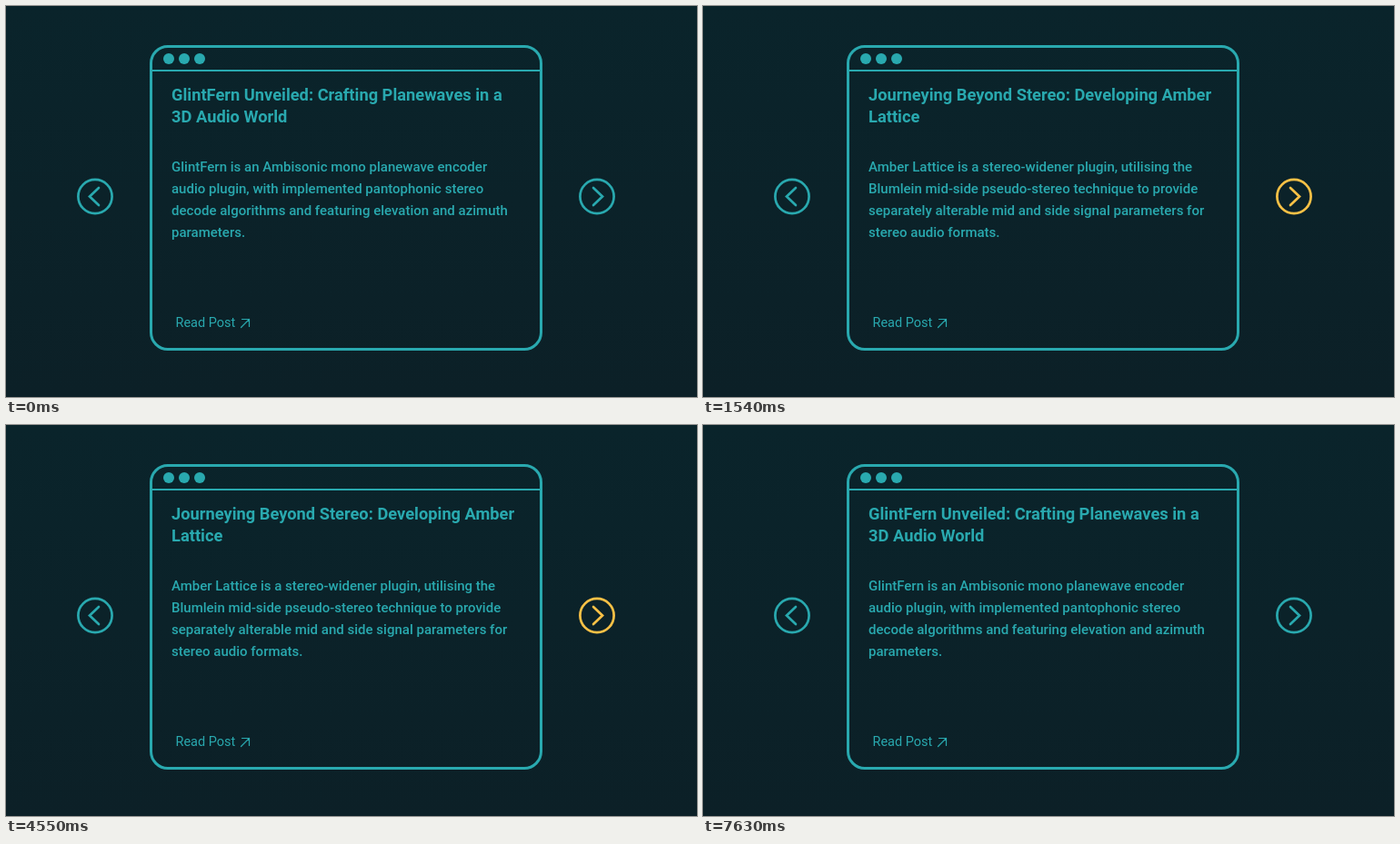
An HTML page for the animation above (8000 ms loop, 760 by 430 pixels).

```html
<!DOCTYPE html>
<html lang="en">
<head>
<meta charset="utf-8">
<title>Post carousel</title>
<style>
  html, body { margin: 0; width: 100%; height: 100%; overflow: hidden; background: #0b2229; }
  svg { display: block; width: 760px; height: 430px; font-family: Roboto, sans-serif; }
  .line { fill: none; stroke: #29a9af; stroke-width: 2.7; stroke-linecap: round; }
  .dots, text { fill: #29a9af; }
  .title { font-size: 18.3px; font-weight: 700; }
  .body { font-size: 15px; font-weight: 500; }
  .read { font-size: 14.5px; font-weight: 400; }
</style>
</head>
<body>
<svg viewBox="0 0 760 430">
  <defs>
    <linearGradient id="bg" x2="0" y2="1">
      <stop stop-color="#0a242b"/>
      <stop offset="1" stop-color="#0c2027"/>
    </linearGradient>
    <g id="arrow">
      <circle r="18.6"/>
      <path d="M-4-9.5 6 0-4 9.5"/>
    </g>
  </defs>
  <rect width="760" height="430" fill="url(#bg)"/>
  <rect class="line" x="159.5" y="44.5" width="429" height="333" rx="18.5" style="stroke-width:3"/>
  <path class="line" d="M160 71H588" style="stroke-width:2"/>
  <g class="dots">
    <circle cx="179" cy="58" r="6"/>
    <circle cx="196" cy="58" r="6"/>
    <circle cx="213" cy="58" r="6"/>
  </g>
  <use class="line" href="#arrow" transform="translate(98 209.5) scale(-1 1)"/>
  <use class="line" href="#arrow" transform="translate(650 209.5)" id="next"/>
  <g id="posts"></g>
  <text class="read" x="186.5" y="353">Read Post</text>
  <path class="line" d="M258.5 353.5 267.5 344.5M259.5 344.5H267.5V352.5" style="stroke-width:1.2"/>
</svg>
<script>
const LOOP = 8000, FADE = 500;
const TEAL = [41, 169, 175], GOLD = [249, 193, 70];

// Two title lines, then the body
const posts = [
  ["GlintFern Unveiled: Crafting Planewaves in a", "3D Audio World",
   "GlintFern is an Ambisonic mono planewave encoder",
   "audio plugin, with implemented pantophonic stereo",
   "decode algorithms and featuring elevation and azimuth", "parameters."],
  ["Journeying Beyond Stereo: Developing Amber", "Lattice",
   "Amber Lattice is a stereo-widener plugin, utilising the",
   "Blumlein mid-side pseudo-stereo technique to provide",
   "separately alterable mid and side signal parameters for", "stereo audio formats."],
  ["Mixing to Making: How Understanding Music", "Keys Can Elevate Your DJ Game",
   "An understanding of the circle of fifths, and music key",
   "counterparts to camelot key codes can be a helpful first",
   "step in bridging the gap between DJing, improvisation", "and music production."]
];
const clicks = [1540, 2520, 3500, 4550, 5530, 6580];

const next = document.getElementById("next");
const groups = posts.map(lines => {
  const g = document.createElementNS("http://www.w3.org/2000/svg", "g");
  g.innerHTML = lines.map((s, i) =>
    `<text class="${i < 2 ? "title" : "body"}" x="182" y="${i < 2 ? 104 + 24 * i : 134 + 24 * i}">${s}</text>`
  ).join("");
  document.getElementById("posts").append(g);
  return g;
});

// The CSS "ease" curve
function ease(x) {
  if (x <= 0) return 0;
  if (x >= 1) return 1;
  const curve = (a, b, u) => 3 * a * u * (1 - u) ** 2 + 3 * b * u * u * (1 - u) + u ** 3;
  let lo = 0, hi = 1;
  for (let i = 0; i < 20; i++) {
    const mid = (lo + hi) / 2;
    if (curve(.25, .25, mid) < x) lo = mid; else hi = mid;
  }
  return curve(.1, 1, lo);
}

function draw(now) {
  const t = now % LOOP;
  const hover = ease((t - 735) / FADE) - ease((t - 7105) / FADE);
  next.style.stroke = `rgb(${TEAL.map((c, i) => c + (GOLD[i] - c) * hover)})`;
  const shown = clicks.filter(c => t >= c).length % posts.length;
  groups.forEach((g, i) => g.style.display = i === shown ? "" : "none");
}

const start = performance.now();
function tick() {
  draw(performance.now() - start);
  requestAnimationFrame(tick);
}
tick();
</script>
</body>
</html>
```
